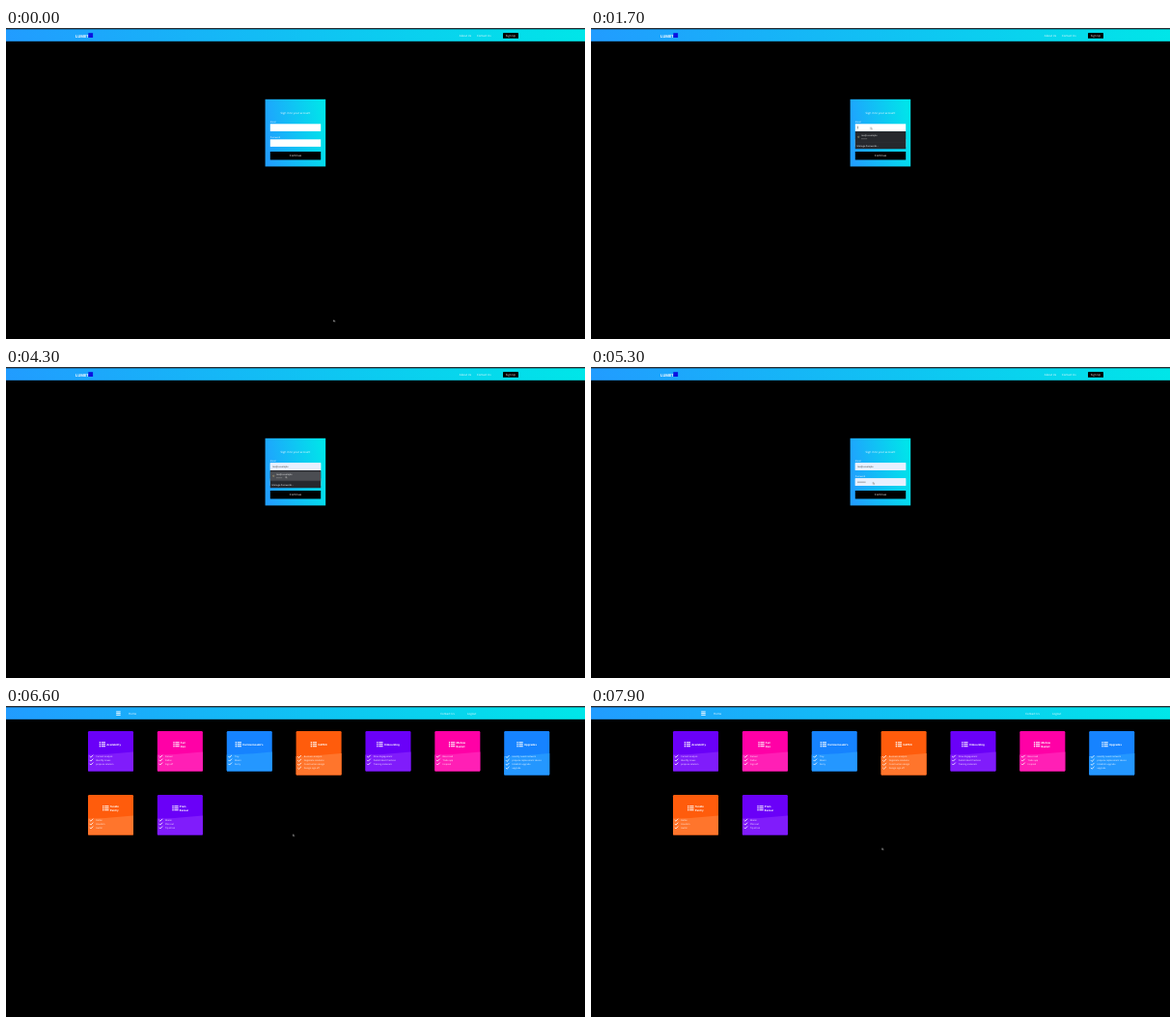
These frames come from a looping animation (600 px wide and 322 px high, 8000 ms). An HTML page:

```html
<!DOCTYPE html>
<html lang="en">
<head>
<meta charset="utf-8">
<title>Sign in</title>
<style>
html, body { margin: 0; width: 100%; height: 100%; overflow: hidden; background: #000; }
svg { display: block; width: 100vw; height: 100vh; }
text { font-family: "Open Sans", "Noto Sans", sans-serif; font-size: 2.3px; fill: #fff; text-rendering: geometricPrecision; }
.nav { font-size: 2.9px; }
.mid { text-anchor: middle; }
.brand { font-size: 4px; font-weight: 700; }
.title { font: 700 2.75px Inter, "Open Sans", sans-serif; }
.ink { fill: #222; }

/* every scene change is a hard cut on the shared 8 s clock */
.login, .home, .menu, .focus, .hover, .email, .pass { animation: 8s step-end infinite; }
.login { animation-name: login; }
.home { animation-name: home; }
.menu { animation-name: menu; }
.focus { animation-name: focus; }
.hover { animation-name: hover; }
.email { animation-name: email; }
.pass { animation-name: pass; }
@keyframes login { 0% { visibility: visible } 82.5%, 100% { visibility: hidden } }
@keyframes home { 0% { visibility: hidden } 82.5%, 100% { visibility: visible } }
@keyframes menu { 0% { opacity: 0 } 18.75% { opacity: 1 } 60%, 100% { opacity: 0 } }
@keyframes focus { 0% { opacity: 0 } 18.75% { opacity: 1 } 48.75%, 100% { opacity: 0 } }
@keyframes hover { 0% { opacity: 0 } 48.75% { opacity: 1 } 60%, 100% { opacity: 0 } }
@keyframes email { 0% { opacity: 0 } 48.75%, 100% { opacity: 1 } }
@keyframes pass { 0% { opacity: 0 } 60%, 100% { opacity: 1 } }

.cursor { animation: move 8s ease-in-out infinite, blink 8s step-end infinite; }
@keyframes move {
  0% { transform: translate(339.3px, 302px) }
  11% { transform: translate(301px, 116px) }
  17%, 34% { transform: translate(289.6px, 102.6px) }
  48%, 60% { transform: translate(289.6px, 112.8px) }
  76%, 90% { transform: translate(297.2px, 132.6px) }
  98.75%, 100% { transform: translate(301.4px, 146.8px) }
}
@keyframes blink { 0% { opacity: 1 } 33.75% { opacity: 0 } 46.25%, 100% { opacity: 1 } }
</style>
</head>
<body>
<svg viewBox="0 0 600 322" preserveAspectRatio="none">
  <defs>
    <linearGradient id="bar">
      <stop stop-color="#219cff"/><stop offset="1" stop-color="#00e6e8"/>
    </linearGradient>
    <linearGradient id="panel" x1="0" y1=".6" x2="1" y2=".4">
      <stop stop-color="#219fff"/><stop offset="1" stop-color="#00e4ea"/>
    </linearGradient>
    <g id="list" fill="#fff">
      <path d="M2.2.3h4.3v1H2.2zM2.2 2.3h4.3v1H2.2zM2.2 4.3h4.3v1H2.2z"/>
      <circle cx=".8" cy=".8" r=".75"/><circle cx=".8" cy="2.8" r=".75"/><circle cx=".8" cy="4.8" r=".75"/>
    </g>
    <path id="tick" d="M0 1.2 1.2 2.4 3.6 0" fill="none" stroke="#fff" stroke-width=".8"/>
  </defs>

  <rect width="600" height="322"/>
  <rect width="600" height="1.4" fill="#292c31"/>
  <rect y="1.3" width="600" height="12.5" fill="url(#bar)"/>

  <g class="login">
    <text class="brand" x="72" y="9.6" textLength="">LUMET</text>
    <rect x="85.3" y="5.2" width="4.8" height="4.8" fill="#0b12e0"/>
    <text class="nav" x="469.8" y="8.9">About Us</text>
    <text class="nav" x="488" y="8.9">Contact Us</text>
    <rect x="515" y="5" width="16" height="5.8" rx=".4"/>
    <text class="nav mid" x="523" y="8.9">Sign Up</text>

    <rect x="268.6" y="73.8" width="62.6" height="69.6" fill="url(#panel)"/>
    <text class="nav mid" x="300" y="88.9">Sign in to your account</text>
    <text x="273.8" y="97.9">Email</text>
    <rect x="273.8" y="99.3" width="52.4" height="7.6" fill="#fff"/>
    <text x="273.8" y="113.9">Password</text>
    <rect x="273.8" y="115.3" width="52.4" height="7.6" fill="#fff"/>
    <rect x="273.8" y="128" width="52.4" height="8.5"/>
    <text class="nav mid" x="300" y="133.3">Continue</text>

    <rect class="focus" x="276" y="101.6" width=".5" height="2.8" fill="#444"/>
    <g class="email">
      <rect x="273.8" y="99.3" width="52.4" height="7.6" fill="#e8f0fe"/>
      <text class="ink" x="276" y="103.9">me@x.example</text>
    </g>
    <g class="pass">
      <rect x="273.8" y="115.3" width="52.4" height="7.6" fill="#e8f0fe"/>
      <path d="M276.4 119.2h8" stroke="#333" stroke-width=".7" stroke-dasharray=".7 .35"/>
    </g>
    <g class="menu">
      <rect x="273.8" y="107" width="52.4" height="18.2" fill="#26282d"/>
      <rect class="hover" x="273.8" y="108.2" width="52.4" height="9.6" fill="#4b4d52"/>
      <path d="M273.8 118.2h52.4" stroke="#3a3c42" stroke-width=".3"/>
      <circle cx="277.2" cy="112.8" r=".7" fill="none" stroke="#b8a878" stroke-width=".5"/>
      <text x="280" y="111.9">me@x.example</text>
      <path d="M280 114.7h6.4" stroke="#aaa" stroke-width=".6" stroke-dasharray=".6 .3"/>
      <text x="275.6" y="122.7">Manage Passwords...</text>
    </g>
  </g>

  <g class="home">
    <path d="M114.2 5.9h4.5M114.2 7.6h4.5M114.2 9.3h4.5" stroke="#fff" stroke-width=".9"/>
    <text class="nav" x="127" y="8.9">Home</text>
    <text class="nav" x="450.2" y="8.9">Contact Us</text>
    <text class="nav" x="478" y="8.9">Logout</text>
    <g id="cards"></g>
  </g>

  <path class="cursor" d="M0 0v2.3l.6-.5.4.8.5-.2-.4-.8h.8z" fill="#ddd" stroke="#333" stroke-width=".2"/>
</svg>
<script>
const tones = {
  purple: ["#6a00f8", "#801cfb"],
  pink: ["#ff00a6", "#ff1fb5"],
  blue: ["#1683ff", "#2497ff"],
  orange: ["#ff5c0c", "#ff752c"]
};

// title, tone, icon offset, items
const cards = [
  ["Availability", "purple", 11.5, "Current analysis|Identify issues|propose solution"],
  ["Fair/Den", "pink", 16.3, "Denver|Dallas|Sign off"],
  ["Harrowmeade's", "blue", 8.7, "Troy|Miami|Derry"],
  ["CAPEX", "orange", 14.9, "Business analysis|Negotiate solutions|Construction design|Design sign off"],
  ["Onboarding", "purple", 11.6, "Drive Engagement|Publish Best Practices|Training materials"],
  ["Mellow/Basket", "pink", 14.4, "Base road|Trade app|Inspired"],
  ["Upgrades", "blue", 13, "Identify needs network|propose replacement device|Establish upgrade|upgrade"],
  ["Tundle/Pantry", "orange", 15, "Dallas|Houston|Austin"],
  ["Plain/Bazaar", "purple", 15.3, "Miami|Plan out|Tip at ten"]
];

function card([title, tone, icon, list], i) {
  const [top, low] = tones[tone];
  const items = list.split("|");
  const lines = title.split("/");
  const x = 85 + 71.87 * (i % 7);
  const y = i < 7 ? 26 : 92;
  const h = items.length > 3 ? 45.6 : 41.6;
  const edge = h > 42 ? 26 : 24.5;
  const heads = lines.map((s, n) =>
    `<text class="title" x="${icon + 7.7}" y="${14.8 + (n - (lines.length - 1) / 2) * 3.4}">${s}</text>`);
  const rows = items.map((s, n) => {
    const ty = (h > 42 ? 27 : 26.7) + n * 3.9;
    return `<use href="#tick" x="1.7" y="${ty - 1.9}"/><text x="8.2" y="${ty}">${s}</text>`;
  });
  return `<g transform="translate(${x} ${y})">
    <rect width="47" height="${h}" rx="1.2" fill="${top}"/>
    <path d="M0 ${edge}Q24 ${edge - .5} 47 ${edge - 3}V${h - 1.2}q0 1.2-1.2 1.2H1.2Q0 ${h} 0 ${h - 1.2}z" fill="${low}"/>
    <use href="#list" x="${icon}" y="11"/>${heads.join("")}${rows.join("")}</g>`;
}

document.getElementById("cards").innerHTML = cards.map(card).join("");
</script>
</body>
</html>
```
